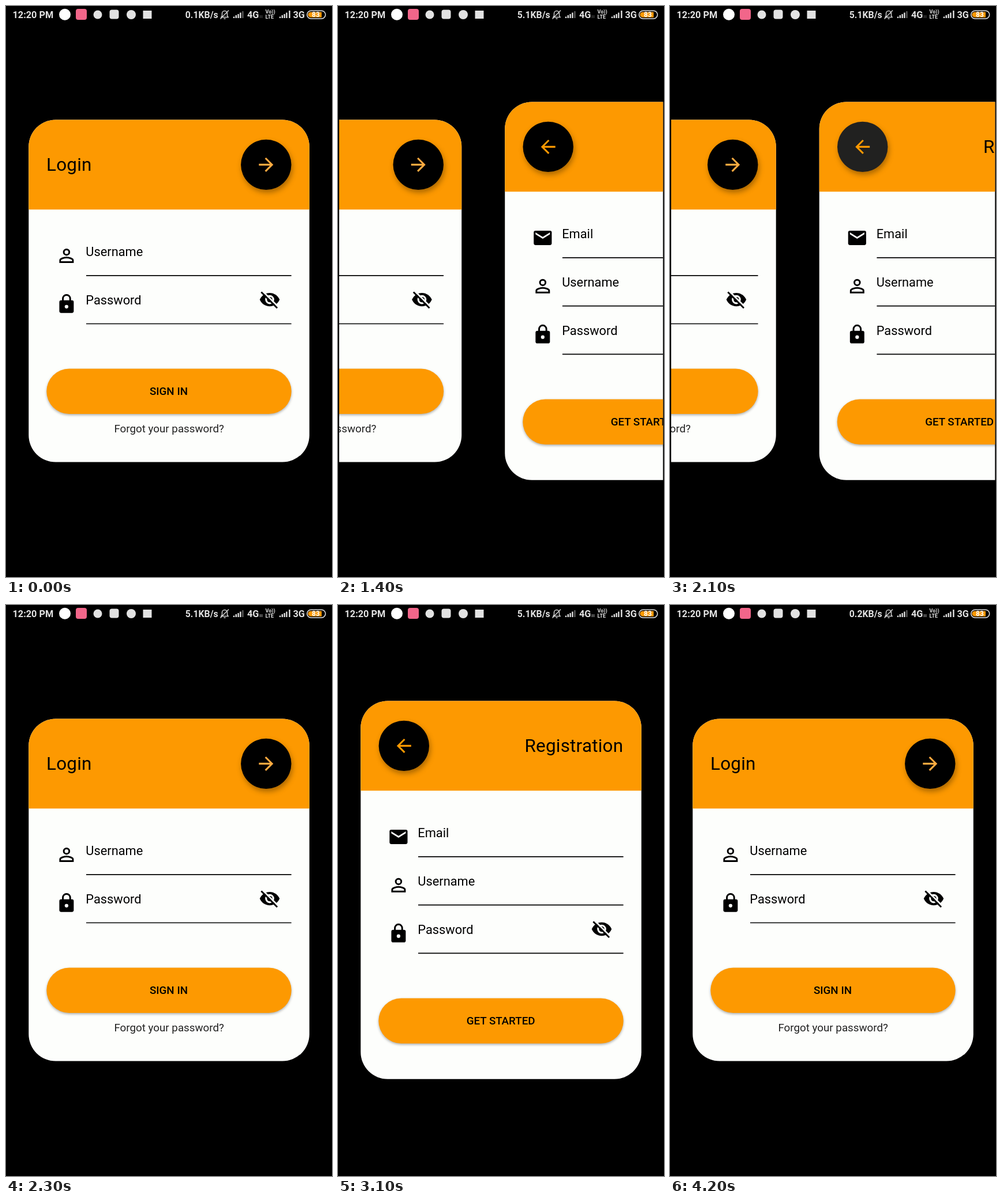
Recreate the animation shown at these times as an HTML page. Size 565 by 991 pixels, loop 4300 ms.

```html
<!DOCTYPE html>
<html lang="en">
<head>
<meta charset="utf-8">
<title>Login and registration pager</title>
<style>
  html, body { margin: 0; width: 100%; height: 100%; overflow: hidden; background: #000; }
  #stage { display: block; width: 565px; height: 991px; font-family: Roboto, sans-serif; }
  .orange { fill: #fd9901; }
  .white { fill: #fdfefc; }
  .title { font-size: 31.4px; letter-spacing: .24px; }
  .label { font-size: 21.8px; }
  .action { font-size: 18.8px; font-weight: 500; text-anchor: middle; }
  .link { font-size: 18.8px; text-anchor: middle; fill: #222; }
  .round { filter: drop-shadow(2px 5px 5px rgba(0, 0, 0, .32)); }
  .pill { filter: drop-shadow(0 2px 2px rgba(0, 0, 0, .32)); }
  .status { fill: #e2e2e2; font-size: 16.3px; font-weight: 700; }
  .status .small { font-size: 9px; }
</style>
</head>
<body>
<svg id="stage" viewBox="0 0 565 991">
  <defs>
    <g id="user" transform="scale(1.56) translate(-12 -12)">
      <g fill="none" stroke="#000" stroke-width="1.9">
        <circle cx="12" cy="8" r="3.05"/>
        <path d="M4.95 19.05V17c0-1.6 4.1-3.05 7.05-3.05s7.05 1.45 7.05 3.05v2.05z"/>
      </g>
    </g>
    <g id="lock" transform="scale(1.56) translate(-12 -12)">
      <rect x="4" y="8" width="16" height="14" rx="2"/>
      <path d="M7.95 9V6a4.05 4.05 0 0 1 8.1 0v3" fill="none" stroke="#000" stroke-width="1.9"/>
      <circle class="white" cx="12" cy="15" r="2"/>
    </g>
    <g id="mail" transform="scale(1.56) translate(-12 -12)">
      <rect x="2" y="4" width="20" height="16" rx="2"/>
      <path class="white" d="M20 8l-8 5-8-5V6l8 5 8-5z"/>
    </g>
    <g id="eye" transform="scale(1.56) translate(-12 -12)">
      <path d="M1 12C2.7 7.6 7 4.5 12 4.5S21.3 7.6 23 12c-1.7 4.4-6 7.5-11 7.5S2.7 16.4 1 12z"/>
      <circle class="white" cx="12" cy="12" r="5"/>
      <circle cx="12" cy="12" r="3"/>
      <path d="M4 2.45l17 17" stroke="#fdfefc" stroke-width="1.8"/>
      <path d="M2.63 3.63l17.74 17.74" stroke="#000" stroke-width="1.8"/>
    </g>
    <path id="arrow" transform="scale(1.56) translate(-12 -12)"
      d="M12 4l-1.41 1.41L16.17 11H4v2h12.17l-5.58 5.59L12 20l8-8z"/>

    <path id="underline" d="M139 40.8H494.6" stroke="#000" stroke-width="1.7"/>
    <g id="email-row">
      <use href="#mail" x="104.9" y="6.4"/>
      <text class="label" x="138.3" y="7.3">Email</text>
      <use href="#underline"/>
    </g>
    <g id="user-row">
      <use href="#user" x="104.9" y="6.4"/>
      <text class="label" x="138.3" y="7.3">Username</text>
      <use href="#underline"/>
    </g>
    <g id="password-row">
      <use href="#lock" x="104.9" y="6.4"/>
      <text class="label" x="138.3" y="7.3">Password</text>
      <use href="#eye" x="457" y="-1.1"/>
      <use href="#underline"/>
    </g>
    <path id="header" class="orange"
      d="M39.3 155.8V46.8a46.8 46.8 0 0 1 46.8-46.8H479a46.8 46.8 0 0 1 46.8 46.8V155.8z"/>
    <rect id="button" class="orange pill" x="70.3" width="424.4" height="78.3" rx="39.15"/>
    <g id="bars">
      <path d="M1 12v-2.5M4.8 12v-5M8.6 12v-7M12.4 12v-9.5" stroke="#e2e2e2" stroke-width="2.4"/>
    </g>
  </defs>

  <rect width="565" height="991"/>

  <svg x="2" width="561.3" height="991" viewBox="2 0 561.3 991">
    <g id="track">
      <g id="login">
        <rect class="white" x="39.3" y="197.4" width="486.5" height="594.2" rx="46.8"/>
        <use href="#header" y="197.4"/>
        <text class="title" x="70" y="286.2">Login</text>
        <circle class="round" cx="450.8" cy="275.4" r="43.7"/>
        <use href="#arrow" x="450.8" y="275.4" fill="#ffab40"/>
        <use href="#user-row" y="427"/>
        <use href="#password-row" y="510.7"/>
        <use href="#button" y="629.6"/>
        <text class="action" x="282" y="675">SIGN IN</text>
        <text class="link" x="282.7" y="740">Forgot your password?</text>
      </g>
      <g id="registration" transform="translate(561.5)">
        <rect class="white" x="39.3" y="166.4" width="486.5" height="656.3" rx="46.8"/>
        <use href="#header" y="166.4"/>
        <text class="title" x="494.3" y="255.2" text-anchor="end">Registration</text>
        <circle id="back" class="round" cx="114.3" cy="244.4" r="43.7"/>
        <g transform="translate(114.3 244.4) scale(-1 1)"><use href="#arrow" class="orange"/></g>
        <use href="#email-row" y="396"/>
        <use href="#user-row" y="479.8"/>
        <use href="#password-row" y="563.6"/>
        <use href="#button" y="682.6"/>
        <text class="action" x="282.2" y="728">GET STARTED</text>
      </g>
    </g>
  </svg>

  <g class="status">
    <text x="11.5" y="21">12:20 PM</text>
    <circle cx="102" cy="14.8" r="10" fill="#fff"/>
    <rect x="121" y="5" width="19" height="19" rx="4" fill="#f2668a"/>
    <circle cx="159" cy="15" r="7.5"/>
    <rect x="179.5" y="6.5" width="16" height="16" rx="4"/>
    <circle cx="217" cy="15" r="8"/>
    <rect x="237.5" y="8" width="15" height="14"/>
    <text id="speed" x="310.8" y="21" font-size="15.8"></text>
    <g fill="none" stroke="#d0d0d0" stroke-width="1.5">
      <path d="M373 19.5h12l-1.5-2.5v-4a4.5 4.5 0 0 0-9 0v4zM377.5 22h3M371.5 22.5l14.5-15"/>
    </g>
    <use href="#bars" x="394" y="9"/>
    <path d="M410.4 21v-12" stroke="#666" stroke-width="2.2"/>
    <text x="418" y="21">4G</text>
    <path id="data" d="M440.5 16v5M443.5 16v5" stroke="#ccc" stroke-width="1.2"/>
    <text class="small" x="449.5" y="13">Vo))</text>
    <text class="small" x="449.5" y="22">LTE</text>
    <use href="#bars" x="474" y="9"/>
    <path d="M491.4 21v-13" stroke="#e2e2e2" stroke-width="2.4"/>
    <text x="497.5" y="21">3G</text>
    <rect x="521.7" y="8.2" width="32" height="13.8" rx="6.9" fill="none" stroke="#e8e8e8" stroke-width="1.5"/>
    <path class="orange" d="M528 10.5H547v9.2H528a4.6 4.6 0 0 1 0-9.2z"/>
    <text x="537" y="19.3" font-size="12" text-anchor="middle" fill="#fff" style="font-size:12px">83</text>
  </g>
</svg>
<script>
  const LOOP = 4300, STEP = 100, SLIDE = 300, PITCH = 561.5;
  const $ = id => document.getElementById(id);

  // Progress of one page slide that begins at the given time.
  const slide = (time, start) => {
    const p = Math.min(1, Math.max(0, (time - start) / SLIDE));
    return p * p * (3 - 2 * p);
  };
  const between = (time, from, to) => time >= from && time < to;

  function draw(time) {
    const page = slide(time, 1239) - slide(time, 1972)
               + slide(time, 2690) - slide(time, 3661);
    $('track').setAttribute('transform', `translate(${-PITCH * page})`);

    const pressed = between(time, 1900, 2300) || between(time, 3600, 4000);
    $('back').setAttribute('fill', pressed ? '#212120' : '#000');

    $('speed').textContent = time < 200 ? '0.1KB/s' : time < 4100 ? '5.1KB/s' : '0.2KB/s';
    $('data').setAttribute('opacity', time < 2200 ? .4 : .85);
  }

  function tick(now) {
    draw(Math.floor(now / STEP + .05) * STEP % LOOP);
    requestAnimationFrame(tick);
  }
  draw(0);
  requestAnimationFrame(tick);
</script>
</body>
</html>
```
